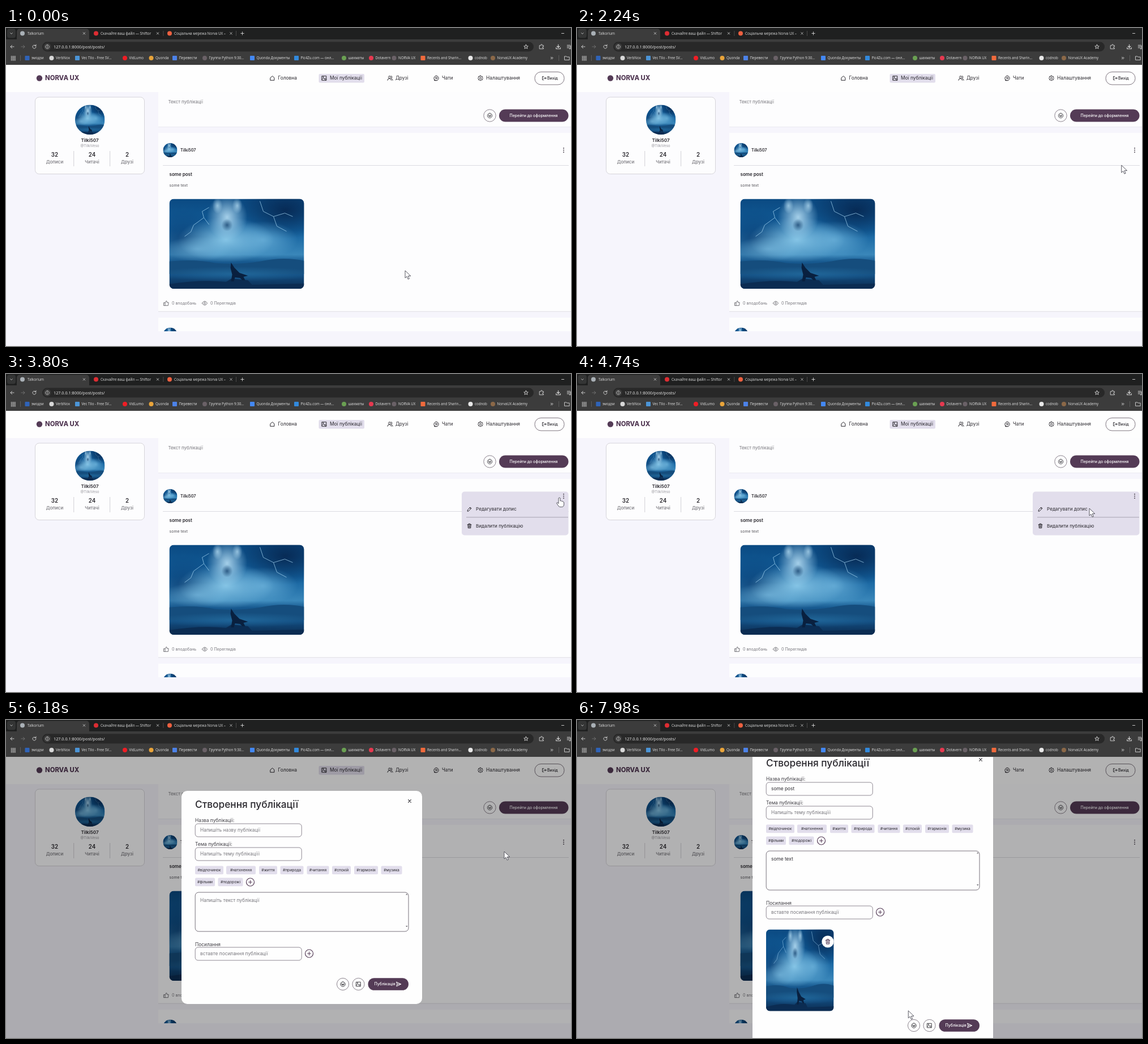
An HTML page with a canvas for the animation above (8000 ms loop, 998 px wide and 561 px high).

```html
<!DOCTYPE html>
<html lang="uk">
<head>
<meta charset="utf-8">
<title>Talkorium</title>
<style>
html, body { margin: 0; width: 100%; height: 100%; overflow: hidden; background: #f6f5fc; }
canvas { display: block; width: 998px; height: 561px; }
</style>
</head>
<body>
<canvas id="stage" width="998" height="561"></canvas>
<script>
const ctx = document.getElementById('stage').getContext('2d');
const LOOP = 8000, MENU_AT = 3440, MODAL_AT = 6180, FILLED_AT = 6280;
const INK = '#29272d', PLUM = '#543b56', GREY = '#77767c', LILAC = '#e2deec';
const UI = 'Inter, sans-serif', CHROME = '"Open Sans", sans-serif';
const USER = 'Tilki507';

function text(str, x, y, size, color = INK, weight = 400, align = 'left', family = UI) {
  ctx.font = `${weight} ${size}px ${family}`;
  ctx.textAlign = align;
  ctx.fillStyle = color;
  ctx.fillText(str, x, y + size * 0.35);
}

function box(x, y, w, h, r, fill, stroke, line = 0.8) {
  ctx.beginPath();
  ctx.roundRect(x, y, w, h, r);
  if (fill) { ctx.fillStyle = fill; ctx.fill(); }
  if (stroke) { ctx.strokeStyle = stroke; ctx.lineWidth = line; ctx.stroke(); }
}

const disc = (x, y, r, fill, stroke, line) => box(x - r, y - r, 2 * r, 2 * r, r, fill, stroke, line);

// Icons live in a 24-unit square.
const ICONS = {
  home: 'M4 10 12 3l8 7v11H4Z',
  picture: 'M3 3h18v18H3ZM3 17l6-6 11 10M14 15l3-3 4 4M8 6a1.5 1.5 0 1 0 .1 0',
  friends: 'M9 3a4.5 4.5 0 1 0 .1 0M1 21q1-8 8-8t8 8M15 3q5 0 5 4.5T16 12M18 14q4 1 5 7',
  chat: 'M12 2a10 10 0 1 0 .1 0M7 9h10M9 14h8M4 18v4h8',
  gear: 'M12 1 15 4 20 5 20 9 23 12 20 15 20 19 15 20 12 23 9 20 4 19 4 15 1 12 4 9 4 5 9 4ZM12 8a4 4 0 1 0 .1 0',
  exit: 'M10 3H3v18h7M9 12h13M18 7l5 5-5 5',
  smile: 'M12 2a10 10 0 1 0 .1 0M7 14q5 6 10 0ZM8 8v2M16 8v2',
  like: 'M2 10h5v12H2ZM7 11l5-9q4 0 3 7h7l-2 13H7',
  eye: 'M1 12q11-17 22 0-11 17-22 0ZM12 8.5a3.5 3.5 0 1 0 .1 0',
  pencil: 'M3 21l1-6L16 3l5 5L9 20ZM14 5l5 5',
  trash: 'M3 6h18M8 6V2h8v4M5 6l1 16h12l1-16M10 10v8M14 10v8',
  send: 'M3 3 22 12 3 21 6 12ZM6 12h15',
  cross: 'M5 5 19 19M19 5 5 19',
  plus: 'M12 4v16M4 12h16',
  back: 'M21 12H3M11 4l-8 8 8 8',
  forward: 'M3 12h18M13 4l8 8-8 8',
  reload: 'M20 12a8 8 0 1 1-3-6M20 2v6h-6',
  info: 'M12 2a10 10 0 1 0 .1 0M12 11v6M12 6v2',
  star: 'M12 2 15 9 22 9.5 16.5 14 18.5 21 12 17 5.500 21 7.500 14 2 9.500 9 9Z',
  puzzle: 'M3 6h6q-1-5 3-5t3 5h6v6q-5-1-5 3t5 3v4H3Z',
  download: 'M12 2v13M6 10l6 6 6-6M2 16v6h20v-6',
  queue: 'M2 5h14M2 11h14M2 17h8M18 20V8h5M18 20a3 3 0 1 1-3-3',
  folder: 'M1 4h8l3 3h11v14H1Z',
  more: 'M3 5l7 7-7 7M12 5l7 7-7 7',
  down: 'M5 9l7 7 7-7'
};

function icon(name, x, y, size, color = INK, line = 0.9) {
  const k = size / 24;
  ctx.save();
  ctx.translate(x - size / 2, y - size / 2);
  ctx.scale(k, k);
  ctx.strokeStyle = color;
  ctx.lineWidth = line / k;
  ctx.lineJoin = ctx.lineCap = 'round';
  ctx.stroke(new Path2D(ICONS[name]));
  ctx.restore();
}

function blob(x, y, rx, ry, rgb, alpha) {
  ctx.save();
  ctx.translate(x, y);
  ctx.scale(rx, ry);
  const g = ctx.createRadialGradient(0, 0, 0, 0, 0, 1);
  g.addColorStop(0, `rgba(${rgb},${alpha})`);
  g.addColorStop(1, `rgba(${rgb},0)`);
  ctx.fillStyle = g;
  ctx.fillRect(-1, -1, 2, 2);
  ctx.restore();
}

// Stormy landscape, designed on a 238 x 158 area.
function photo(x, y, w, h, r) {
  ctx.save();
  ctx.beginPath();
  ctx.roundRect(x, y, w, h, r);
  ctx.clip();
  ctx.translate(x, y);
  ctx.scale(w / 238, h / 158);
  const sky = ctx.createLinearGradient(0, 0, 0, 158);
  [[0, '#0b4a82'], [0.35, '#125f9c'], [0.62, '#3a87ba'], [0.7, '#17598f'], [0.85, '#124c80'], [1, '#0c2c50']]
    .forEach(s => sky.addColorStop(...s));
  ctx.fillStyle = sky;
  ctx.fillRect(0, 0, 238, 158);
  blob(205, 20, 85, 50, '5,30,68', 0.75);
  blob(25, 70, 70, 50, '8,50,100', 0.6);
  blob(100, 72, 85, 40, '150,211,240', 0.85);
  blob(165, 72, 62, 33, '115,185,224', 0.7);
  blob(50, 88, 60, 22, '125,190,226', 0.65);
  blob(102, 32, 36, 40, '190,228,248', 0.85);
  blob(85, 12, 9, 14, '185,224,245', 0.7);
  blob(120, 12, 9, 14, '185,224,245', 0.7);
  blob(102, 46, 10, 11, '10,55,100', 0.7);
  ctx.strokeStyle = 'rgba(175,222,250,.75)';
  ctx.lineWidth = 0.9;
  ctx.stroke(new Path2D('M70 15 58 22 61 33 43 46 38 58 27 66M61 33 70 45M160 4 166 22 184 31 190 48 207 57M184 31 204 25 218 31'));
  ctx.fillStyle = '#154d7d';
  ctx.fill(new Path2D('M0 110Q45 105 82 113Q125 116 160 110Q202 101 238 109V132H0Z'));
  blob(119, 132, 150, 13, '35,108,159', 0.8);
  ctx.fillStyle = '#0b2c52';
  ctx.fill(new Path2D('M0 150Q55 141 100 146L110 140 139 143 146 151 238 149V158H0Z'));
  ctx.fillStyle = '#09203f';
  ctx.fill(new Path2D('M109 112 115 121 124 130 139 135 131 137 134 143H129L125 139 116 138 114 145H109L111 133 108 121Z'));
  ctx.restore();
}

function bookmark([x, label, color, round]) {
  round ? disc(x, 53, 4, color) : box(x - 4, 49, 8, 8, 1, color);
  text(label, x + 7.5, 53, 6.2, '#e3e3e3', 400, 'left', CHROME);
}

const BOOKMARKS = [
  [37.5, 'эмодзи', '#2f63b8'], [80.5, 'VerbNox', '#d8d8d8', 1], [126, 'Vec Tilo - Free SV...', '#4b94d6'],
  [210, 'VidLumo', '#f01d25', 1], [256.5, 'Quonda', '#e9a43a', 1], [298, 'Перевести', '#4c82e8'],
  [351, 'Группа Python 9:30...', '#6a6167', 1], [435, 'Quonda Документы', '#4388f3'], [513, 'Pic4Zu.com — онл...', '#3289dc'],
  [597, 'шахматы', '#6aa052', 1], [645, 'Dotavern', '#e63950', 1], [685.5, 'NORVA UX', '#6a6167', 1],
  [736.5, 'Recents and Sharin...', '#f06a3c'], [820.5, 'codnob', '#e8e8e8', 1], [860, 'NorvaUX Academy', '#8b6848', 1]
];

function tabTitle(str, x, w) {
  ctx.save();
  ctx.beginPath();
  ctx.rect(x, 0, w, 20);
  ctx.clip();
  text(str, x, 9.5, 6.3, '#dedede', 400, 'left', CHROME);
  ctx.restore();
}

function browser() {
  const light = '#d6d6d6';
  ctx.fillStyle = '#1f2020';
  ctx.fillRect(0, 0, 998, 21);
  ctx.fillStyle = '#3c3c3c';
  ctx.fillRect(0, 20, 998, 45);
  box(2, 1.5, 15, 16, 4, '#343535');
  icon('down', 9.5, 9.5, 6, light);
  box(19, 1.500, 128, 24, 5, '#3c3c3c');
  disc(29, 9.5, 4, '#a9b0b6');
  tabTitle('Talkorium', 38, 90);
  disc(159, 9.5, 4, '#dd2c32');
  tabTitle('Скачайте ваш файл — Shiftor', 167, 90);
  disc(289, 9.5, 4, '#ed6040');
  tabTitle('Соціальна мережа Norva UX – F', 297, 91);
  [138, 268, 397.5].forEach(x => icon('cross', x, 9.5, 6, light, 0.8));
  ctx.fillStyle = '#555';
  ctx.fillRect(277.5, 5, 0.8, 9);
  ctx.fillRect(406, 5, 0.8, 9);
  icon('plus', 417.5, 9.5, 8, light, 0.9);
  ctx.fillStyle = light;
  ctx.fillRect(981, 9, 5, 0.9);

  icon('back', 11, 33, 8, light);
  icon('forward', 30, 33, 8, '#747474');
  icon('reload', 50, 33, 9, light);
  box(64, 24.5, 868, 17, 8.5, '#282828');
  disc(73, 33, 6.5, '#3b3b3b');
  icon('info', 73, 33, 8, light, 0.8);
  text('127.0.0.1:8000/post/posts/', 84, 33, 7.25, '#f0f0f0', 400, 'left', CHROME);
  icon('star', 918.5, 33, 9, light);
  icon('puzzle', 946, 33, 9, light);
  icon('download', 975.5, 33, 9, light, 1.1);
  icon('queue', 995, 33, 9, light);

  for (let i = 0; i < 9; i++) {
    box(9 + (i % 3) * 2.9, 49.6 + Math.floor(i / 3) * 2.9, 1.9, 1.9, 0.3, null, light, 0.6);
  }
  ctx.fillStyle = '#666';
  ctx.fillRect(25, 48, 0.8, 10);
  ctx.fillRect(976, 48, 0.8, 10);
  BOOKMARKS.forEach(bookmark);
  icon('more', 964.5, 53, 6, light);
  icon('folder', 991, 53, 9, light);
}

function dots(x, y) {
  [-3.4, 0, 3.4].forEach(d => disc(x, y + d, 1, '#4c4650'));
}

function header() {
  ctx.fillStyle = '#fefefe';
  ctx.fillRect(0, 65, 998, 48);
  disc(59, 88.5, 5.2, PLUM);
  text('NORVA UX', 69, 88.5, 11.3, PLUM, 800);
  box(552.5, 81, 80.5, 15.500, 2, LILAC);
  [['home', 470.5, 'Головна', 480.5], ['picture', 562, 'Мої публікації', 572], ['friends', 678.5, 'Друзі', 688],
   ['chat', 760, 'Чати', 770], ['gear', 838, 'Налаштування', 848]].forEach(([name, ix, label, x]) => {
    icon(name, ix, 88.5, 10, INK, 1);
    text(label, x, 88.5, 8.4);
  });
  box(934, 77.5, 52, 22.5, 11, '#fefefe', '#5d525f');
  icon('exit', 950.5, 88.5, 8);
  text('Вихід', 956, 88.5, 6.9, INK, 500);
}

function profile() {
  box(51.5, 122, 193, 135.5, 7, '#fdfdfe', '#cdcbd1');
  photo(122, 135.500, 52.5, 52.5, 26);
  text(USER, 148, 198, 8.1, INK, 600, 'center');
  text('@TilkiVeso', 148, 207.5, 6.3, '#98979d', 400, 'center');
  [[86, '32', 'Дописи'], [152, '24', 'Читачі'], [214, '2', 'Друзі']].forEach(([x, n, label]) => {
    text(n, x, 224, 9.8, INK, 600, 'center');
    text(label, x, 236, 8, GREY, 500, 'center');
  });
  ctx.fillStyle = '#cdcbd1';
  ctx.fillRect(119.3, 217, 0.9, 27);
  ctx.fillRect(183.2, 217, 0.9, 27);
}

function feed(hover) {
  ctx.fillStyle = '#fdfdfe';
  ctx.fillRect(269, 113, 729, 61);
  ctx.fillRect(269, 185, 729, 315);
  ctx.fillRect(269, 511, 729, 24);
  ctx.fillStyle = '#dedde3';
  ctx.fillRect(269, 499.6, 729, 1);
  ctx.fillStyle = '#e9e8ef';
  ctx.fillRect(269, 174, 729, 0.8);

  text('Текст публікації', 286.5, 130.5, 7.9, GREY);
  disc(854.5, 154.5, 10.7, '#fdfdfe', '#6e6470');
  icon('smile', 854.5, 154.5, 10);
  box(871, 143.5, 122.5, 22, 11, PLUM);
  text('Перейти до оформлення', 932, 154.5, 6.95, '#fff', 500, 'center');

  photo(277.5, 203, 25, 25, 12.5);
  text(USER, 308, 215.5, 7.1, INK, 600);
  if (hover) disc(985, 215.5, 8.5, '#cbc6d4');
  dots(985, 215.5);
  ctx.fillStyle = '#d9d8de';
  ctx.fillRect(277, 242, 717, 0.9);
  text('some post', 288.5, 258, 8, INK, 600);
  text('some text', 288.5, 278, 7, '#55545a');
  photo(288.5, 301.5, 238, 158.5, 8);
  icon('like', 283, 485.5, 10, '#55535a', 0.8);
  text('0 вподобань', 293, 485.5, 7, GREY);
  icon('eye', 351, 485.5, 10, '#55535a', 0.8);
  text('0 Переглядів', 361, 485.500, 7, GREY);

  ctx.save();
  ctx.beginPath();
  ctx.rect(269, 511, 729, 24);
  ctx.clip();
  photo(277.5, 528.5, 25, 25, 12.5);
  ctx.restore();
}

function menu() {
  box(805, 207.5, 188.5, 77, 5, LILAC);
  dots(985, 215.5);
  icon('pencil', 818.5, 238.5, 9, INK, 1);
  text('Редагувати допис', 830, 238.5, 8.15);
  ctx.fillStyle = '#9b95a3';
  ctx.fillRect(813, 252.4, 180, 0.8);
  icon('trash', 818.5, 268, 9, INK, 1);
  text('Видалити публікацію', 830, 268, 8.15);
}

function field(label, value, y, typed) {
  if (label) text(label, 334, y - 17, 8.4, '#3c3a40');
  box(334.2, y - 11.5, 188, 23, 5, '#fefefe', '#736b78');
  text(value, 343, y, 8.35, typed ? INK : GREY);
}

function plusButton(x, y) {
  disc(x, y, 7, '#fefefe', PLUM, 1.2);
  icon('plus', x, y, 9, PLUM, 1);
}

const TAGS = [
  [334, 257.5, 50, 'відпочинок'], [389, 257.5, 52, 'натхнення'], [447, 257.5, 32, 'життя'], [484.5, 257.5, 41, 'природа'],
  [531.5, 257.5, 39, 'читання'], [576, 257.5, 33, 'спокій'], [615, 257.5, 42, 'гармонія'], [662.5, 257.5, 37, 'музика'],
  [334, 278.5, 35, 'фільми'], [374.5, 278.5, 44, 'подорожі']
];

function modal(filled) {
  const shift = filled ? 73 : 0;
  box(310, 125 - shift, 425, 376 + 2 * shift, 10, '#fefefe');
  ctx.save();
  ctx.translate(0, -shift);
  icon('cross', 713, 143, 8, INK, 1.1);
  text('Створення публікації', 334, 149, 17.3, INK, 500);
  field('Назва публікації:', filled ? 'some post' : 'Напишіть назву публікації', 194.5, filled);
  field('Тема публікації:', 'Напишіть тему публікаціїі', 236.5);
  TAGS.forEach(([x, y, w, label]) => {
    box(x, y, w, 14.8, 2, LILAC);
    text('#' + label, x + w / 2, y + 7.4, 6.7, INK, 400, 'center');
  });
  plusButton(431.5, 286);
  box(334.2, 304, 376.8, 69, 6, '#fefefe', '#57505c');
  text(filled ? 'some text' : 'Напишіть текст публікації', 343, 318.5, 8.35, filled ? INK : GREY);
  ctx.fillStyle = '#77757b';
  ctx.fill(new Path2D('M706 308.500 707.8 306 709.5 308.500ZM706 363 707.8 365.500 709.5 363Z'));
  field('', 'вставте посилання публікації', 412.5);
  text('Посилання', 334, 396, 8.4, '#3c3a40');
  plusButton(535.5, 412);
  ctx.restore();

  if (filled) {
    photo(334, 369.5, 119.5, 144, 7);
    disc(443, 391, 10.6, '#fefefe');
    icon('trash', 443, 391, 10, PLUM, 1);
  }
  const y = 466 + shift;
  disc(595, y, 10.6, '#fefefe', '#6e6470');
  icon('smile', 595, y, 10);
  disc(622.5, y, 10.6, '#fefefe', '#6e6470');
  icon('picture', 622.5, y, 10);
  box(639.5, y - 10.8, 71.5, 21.6, 10.8, PLUM);
  text('Публікація', 650.5, y, 7, '#fff', 500);
  icon('send', 693.5, y, 10, '#fff', 1);
}

// Pointer stops: time, x, y.
const PATH = [
  [0, 705, 428], [600, 735, 420], [1520, 853, 349], [2400, 972, 232], [2720, 979.5, 217], [3700, 979.5, 217],
  [4740, 905, 237], [5600, 882, 233], [6160, 880, 232], [6640, 880, 232], [7500, 640, 478], [8000, 585, 513]
];

function pointerAt(t) {
  const i = PATH.findIndex(p => p[0] > t);
  const a = PATH[i - 1], b = PATH[i];
  const u = (t - a[0]) / (b[0] - a[0]);
  const k = u * u * (3 - 2 * u);
  return [a[1] + (b[1] - a[1]) * k, a[2] + (b[2] - a[2]) * k];
}

const ARROW = new Path2D('M0 0V13L3 10.3 5.200 15.200 7.400 14.200 5.200 9.600 9.800 9.500Z');
const HAND = new Path2D('M-1.5 1.5Q0-.5 1.5 1.5V6.5Q3 5.500 4.200 7Q5.600 6.300 6.600 7.800Q8 8 8 9.500V12.500Q8 17 4 17H1Q-1 17-2.500 14L-5 10.200Q-4.500 8.600-2.600 9.600L-1.500 11Z');

function pointer(x, y, shape) {
  ctx.save();
  ctx.translate(x, y);
  ctx.fillStyle = '#fff';
  ctx.strokeStyle = '#454450';
  ctx.lineWidth = 0.9;
  ctx.lineJoin = 'round';
  ctx.fill(shape);
  ctx.stroke(shape);
  ctx.restore();
}

function draw(t) {
  const [x, y] = pointerAt(t);
  const menuOpen = t >= MENU_AT && t < MODAL_AT;
  const hover = t < MODAL_AT && Math.hypot(x - 985, y - 215.5) < 9;
  ctx.fillStyle = '#f6f5fc';
  ctx.fillRect(0, 0, 998, 561);
  feed(hover && !menuOpen);
  profile();
  header();
  if (menuOpen) menu();
  if (t >= MODAL_AT) {
    ctx.fillStyle = 'rgba(0,0,0,.3)';
    ctx.fillRect(0, 65, 998, 496);
    modal(t >= FILLED_AT);
  }
  browser();
  pointer(x, y, hover ? HAND : ARROW);
}

const start = performance.now();
function tick() {
  draw((performance.now() - start) % LOOP);
  requestAnimationFrame(tick);
}
tick();
</script>
</body>
</html>
```
